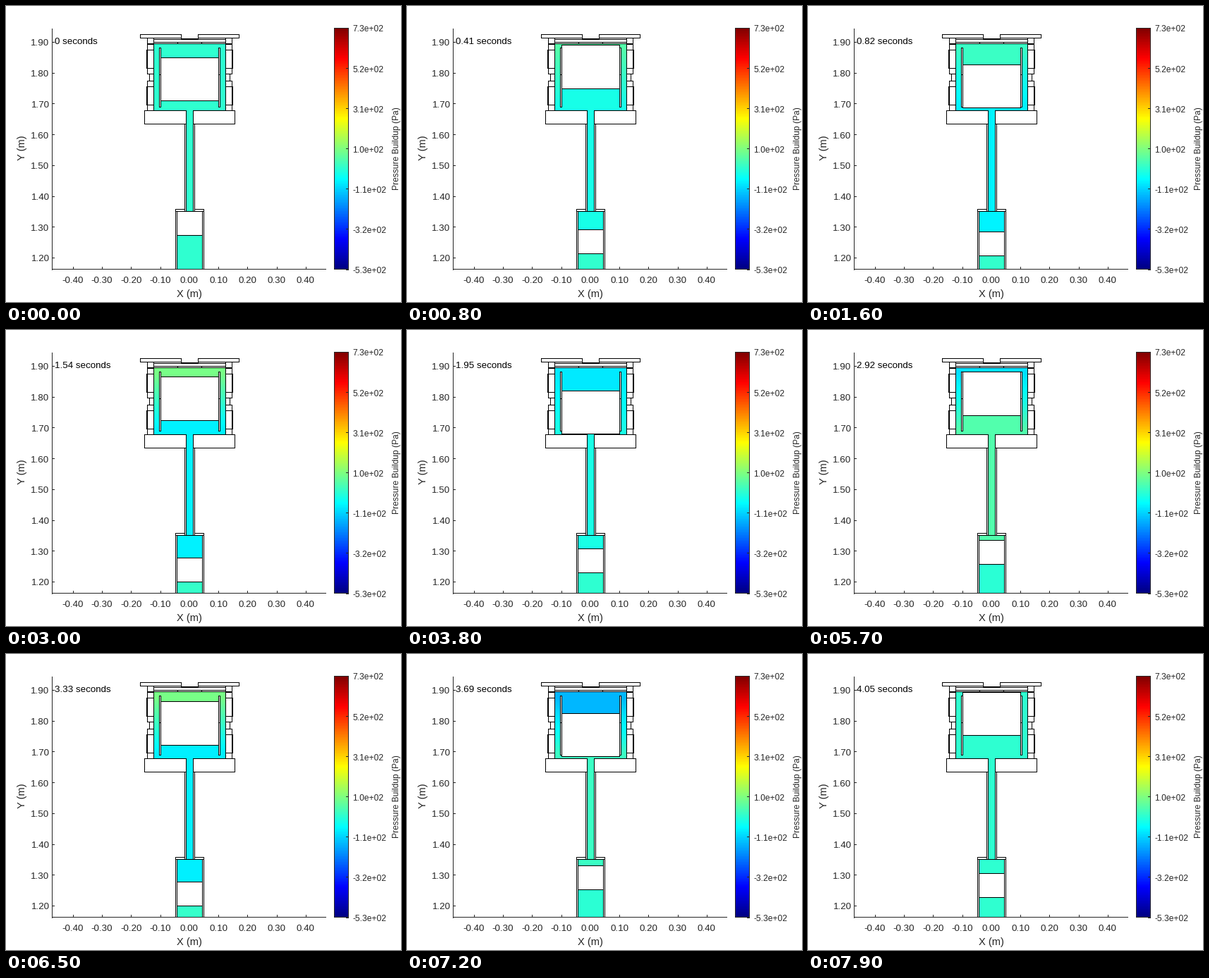
A matplotlib script that plays this animation: 560 by 420 pixels, repeating every 8000 ms.

```python
import numpy as np
import matplotlib.pyplot as plt
from matplotlib.animation import FuncAnimation
from matplotlib.patches import Rectangle

W, H, DPI = 560, 420, 100
PX = 72 / DPI
SNAP = .25              # keeps pixel snapping on the intended row and column
FRAMES, INTERVAL = 80, 100
DT = 0.05125            # simulated seconds per frame
OMEGA = 2 * np.pi * 100 / 60
P_MIN, P_MAX = -530, 730
INK = "#262626"

plt.rcParams["font.family"] = "Liberation Sans"
fig = plt.figure(figsize=(W / DPI, H / DPI), dpi=DPI, facecolor="white")
ax = fig.add_axes([0, 0, 1, 1])
ax.axis("off")


def jet(x):
    x = np.asarray(x, float)[..., None]
    return np.clip(1.5 - np.abs(4 * x - np.array([3, 2, 1])), 0, 1)


def colour(p):
    return jet((np.asarray(p, float) - P_MIN) / (P_MAX - P_MIN))


def box(x0, y0, x1, y1, fill="none", edge="black", z=5):
    patch = Rectangle((x0 + SNAP, y0 + SNAP), x1 - x0, y1 - y0,
                      facecolor=fill, edgecolor=edge, linewidth=PX,
                      antialiased=False, zorder=z)
    ax.add_patch(patch)
    return patch


def line(x0, y0, x1, y1, color="black", z=6):
    ax.plot([x0 + SNAP, x1 + SNAP], [y0 + SNAP, y1 + SNAP], color=color,
            lw=PX, antialiased=False, solid_capstyle="butt", zorder=z)


def mirrored(x0, y0, x1, y1, fill="none", z=5):
    box(x0, y0, x1, y1, fill, z=z)
    box(520 - x1, y0, 520 - x0, y1, fill, z=z)


def label(x, y, s, px, ha="center", color=INK, **kw):
    return ax.text(x, y, s, fontsize=px * PX, ha=ha, color=color, zorder=9,
                   va=kw.pop("va", "center_baseline"), **kw)


def strip(rgb, extent, z):
    return ax.imshow(rgb[:, None], extent=extent, aspect="auto",
                     interpolation="nearest", zorder=z)


def span(patch, y0, y1):
    patch.set_y(round(y0) + SNAP)
    patch.set_height(round(y1) - round(y0))


# Axes
line(65, 32, 65, 374, INK, 1)
line(65, 373, 453, 373, INK, 8)
for k in range(-4, 5):
    x = 259.8 + 41.25 * k
    line(round(x), 370, round(x), 373, INK, 1)
    label(x, 388.5, f"{k / 10:.2f}", 13.33)
for k in range(8):
    y = 51 + 43.7 * k
    line(65, round(y), 68, round(y), INK, 1)
    label(61.5, y + 1, f"{1.9 - k / 10:.2f}", 13.33, "right")
label(259.5, 407.5, "X (m)", 14.67)
label(23, 201, "Y (m)", 14.67, rotation=90, va="center")

# Colour bar
strip(jet(np.linspace(1, 0, 256)), (465, 486, 374, 31), 2)
box(465, 31, 485, 373, edge=INK)
for k in range(7):
    y = 31 + 57.1 * k
    line(482, round(y), 485, round(y), INK)
    label(491.5, y + 1, f"{7.3 - 2.1 * k:.1f}e+02", 12, "left")
label(554, 202, "Pressure Buildup (Pa)", 12, rotation=90, va="center")

# Fixed engine parts
mirrored(190, 40, 248, 45)
line(248, 46, 272, 46)
box(209, 47, 311, 51)
box(243, 51, 277, 53)
box(196, 148, 324, 167, "white", z=3)
box(253, 167, 267, 291, "white", z=3)
box(240, 288, 280, 373, "white", z=2)
line(240, 291, 280, 291)
mirrored(200, 45, 209, 53)
mirrored(203, 96, 209, 106)
for y in (54, 106):
    mirrored(200, y, 209, y + 42)
    mirrored(199, y + 8, 209, y + 34)
mirrored(217, 59, 219, 143, "white", z=7)
mirrored(217, 97, 219, 97, z=8)

# Gas spaces and moving parts
channel = strip(np.ones((95, 3)), (209, 312, 148, 53), 3)
box(209, 53, 311, 148)
hot = box(219, 53, 301, 73, edge="none", z=4)
cold = box(219, 134, 301, 148, edge="none", z=4)
displacer = box(219, 73, 301, 134, "white", z=6)
pipe = box(255, 148, 265, 291, z=6)
mouth = box(256, 148, 265, 149, edge="none", z=7)
work = box(242, 291, 278, 292, z=4)
piston = box(242, 291, 278, 325, "white", z=5)
buffer = box(242, 325, 278, 373, z=4)
clock = label(69, 49.5, "", 13.33, "left", "black")
ax.set_xlim(0, W)
ax.set_ylim(H, 0)

# Share of the cold pressure along the side channels, top to bottom
COLD_SHARE = np.clip((np.arange(53, 148) - 62) / 78, 0, 1)


def slide(angle, r, rod=43.7):
    """Slider-crank travel, positive downwards."""
    return rod - r * np.cos(angle) - np.sqrt(rod**2 - (r * np.sin(angle))**2)


def update(i):
    t = i * DT
    a = OMEGA * t
    c, s = np.cos(a), np.sin(a)
    on = i > 0          # the gas starts at rest
    p_hot = on * (-40 - 125 * c - 40 * s)
    p_cold = on * (-14 + 70 * c - 14 * s)
    p_buffer = on * -8 * c

    top = 69.7 + slide(a + np.pi / 2, 16.1)
    span(hot, 53, top)
    span(displacer, top, top + 61.4)
    span(cold, top + 61.4, 148)
    low = 307.3 + slide(a, 16.4)
    span(work, 291, low)
    span(piston, low, low + 33.9)
    span(buffer, low + 33.9, 373)

    channel.set_data(colour(p_hot + (p_cold - p_hot) * COLD_SHARE)[:, None])
    hot.set_facecolor(colour(p_hot))
    for part in (cold, pipe, mouth, work):
        part.set_facecolor(colour(p_cold))
    buffer.set_facecolor(colour(p_buffer))
    clock.set_text(f"{np.floor(t * 100 + .5 + 1e-9) / 100:g} seconds")
    return channel, hot, cold, displacer, pipe, mouth, work, piston, buffer, clock


anim = FuncAnimation(fig, update, frames=FRAMES, interval=INTERVAL,
                     repeat=True, repeat_delay=0, blit=False)
plt.show()
```
